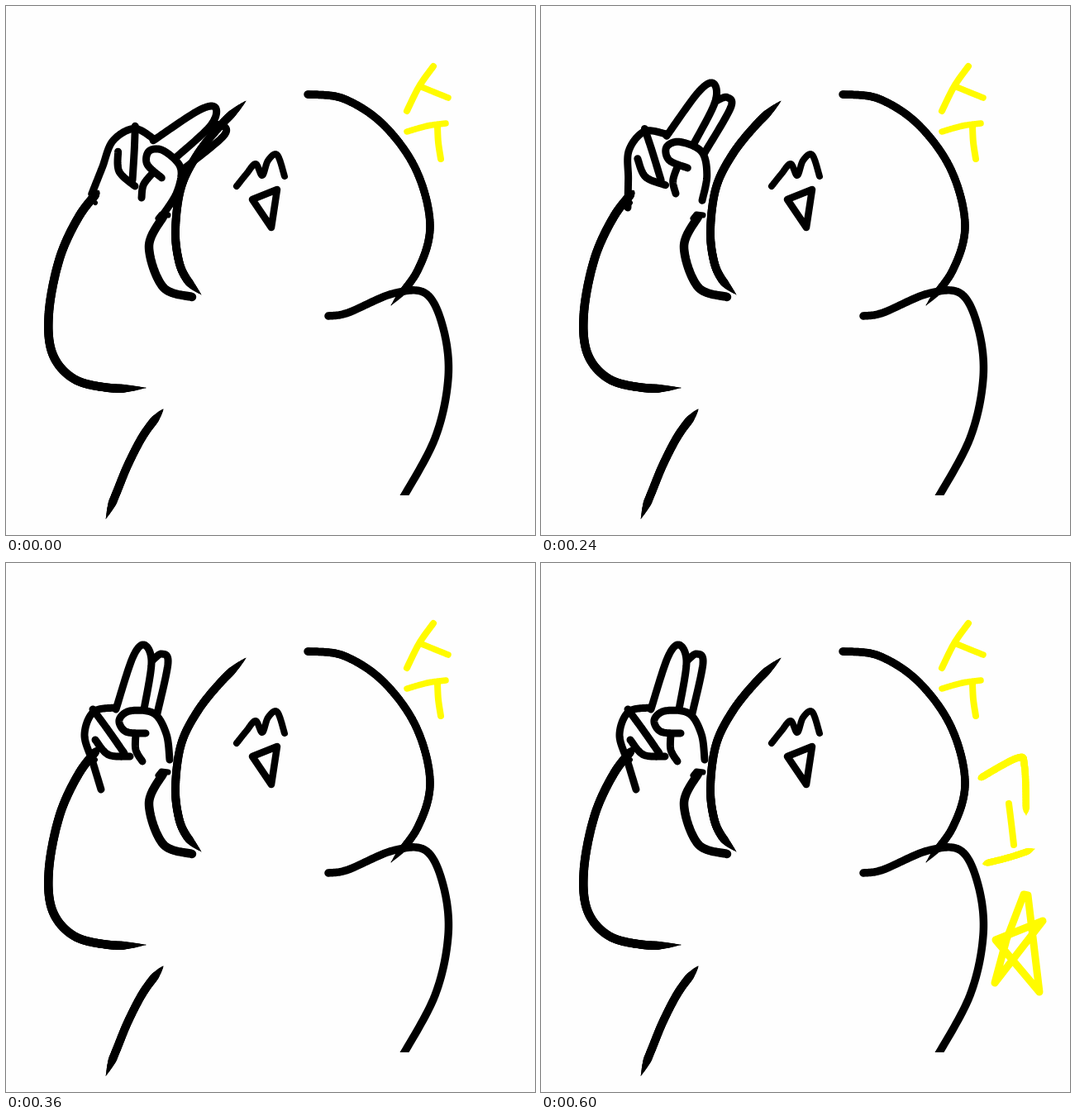
These frames come from a looping animation (640 px wide and 640 px high, 720 ms). An HTML page with a canvas:

```html
<!DOCTYPE html>
<html lang="ko">
<head>
<meta charset="utf-8">
<title>Salute</title>
<style>
html, body { margin: 0; width: 100%; height: 100%; overflow: hidden; background: #fefefe; }
canvas { display: block; width: 100vmin; height: 100vmin; }
</style>
</head>
<body>
<canvas width="640" height="640"></canvas>
<script>
const ctx = document.querySelector('canvas').getContext('2d');
const STEP = 120, STEPS = 6;
const YELLOW = '#fffb00';

// Wrist pivot and tilt in degrees; the hand swings away from the brow and stays
const WRIST = { x: 165, y: 240 };
const POSES = [
  { x: 164, y: 232, tilt: 38.5 },
  { x: 168, y: 228, tilt: 29 },
  { x: 163, y: 227, tilt: 18 },
  { ...WRIST, tilt: 0 }
];

const parse = s => s.split(' ').map(q => q.split(',').map(Number));

// Catmull-Rom curve through the key points
function smooth(keys) {
  const at = i => keys[Math.max(0, Math.min(keys.length - 1, i))];
  const mix = (a, b, c, d, t) => 0.5 * (2 * b + (c - a) * t +
    (2 * a - 5 * b + 4 * c - d) * t * t + (3 * b - a - 3 * c + d) * t ** 3);
  const out = [keys[0]];
  for (let i = 0; i < keys.length - 1; i++) {
    for (let t = 0.05; t < 1.01; t += 0.05) {
      out.push([0, 1].map(n => mix(at(i - 1)[n], at(i)[n], at(i + 1)[n], at(i + 2)[n], t)));
    }
  }
  return out;
}

function trace(points, width) {
  ctx.lineWidth = width;
  ctx.beginPath();
  points.forEach(p => ctx.lineTo(...p));
  ctx.stroke();
}

const poly = (keys, width) => trace(parse(keys), width);

// Curved stroke; head and tail are the lengths of its pointed ends
function brush(keys, width, head = 0, tail = 0) {
  const points = smooth(parse(keys));
  if (!head && !tail) return trace(points, width);
  const gap = i => Math.hypot(points[i][0] - points[i - 1][0], points[i][1] - points[i - 1][1]);
  let left = 0, done = 0;
  for (let i = 1; i < points.length; i++) left += gap(i);
  for (let i = 1; i < points.length; i++) {
    const d = gap(i);
    done += d;
    left -= d;
    const start = head ? Math.min(1, done / head) : 1;
    const end = tail ? Math.min(1, left / tail) : 1;
    trace([points[i - 1], points[i]], Math.max(1, width * (start * end) ** 0.8));
  }
}

function drawBody() {
  // Head
  brush('290,115 260,144 232,179 212,219 205,270 209,308 219,331 236,349', 10, 26, 20);
  brush('365,107 408,112 456,143 496,198 513,265 498,320 466,362', 9.5, 0, 24);
  // Right shoulder, cut flat at the bottom
  ctx.save();
  ctx.beginPath();
  ctx.rect(0, 0, 640, 592);
  ctx.clip();
  brush('390,375 414,371 468,348 508,348 529,390 535,450 519,523 478,599', 9.5);
  ctx.restore();
  // Raised arm
  brush('112,224 88,255 65,305 52,370 56,420 82,451 125,462 169,462', 10.5, 8, 28);
  poly('95,241 102,233 108,238', 6);
  brush('190,255 173,291 190,340 225,352', 10.5);
  poly('184,257 188,252 196,253', 7);
  // Left side
  brush('190,488 167,518 148,554 134,588 121,620', 10, 18, 20);
  // Face
  brush('279,218 291,203 302,191 310,205 317,187 328,180 337,206', 8);
  poly('298,234 328,222 321,268 298,234', 8.5);
}

function drawHand({ x, y, tilt }) {
  ctx.save();
  ctx.translate(x, y);
  ctx.rotate(tilt * Math.PI / 180);
  ctx.translate(-WRIST.x, -WRIST.y);
  [
    '115,274 105,241 95,208 106,180 133,175',         // back
    '133,177 153,115 167,99 176,120 167,177',         // index
    '177,118 188,110 196,121 183,182',                // middle
    '169,206 145,204 137,190 150,179 179,182 194,207 198,238', // thumb
    '105,177 122,200 143,230',                        // folded fingers
    '108,214 124,232 150,234',
    '157,207 157,226 165,240'
  ].forEach(keys => brush(keys, 9));
  ctx.restore();
}

function drawSu() {
  brush('517,73 500,97 485,127', 8);
  brush('503,98 520,105 535,111', 7.5);
  brush('485,152 510,145 532,142', 7.5);
  brush('522,146 523,165 526,185', 8);
}

function drawGo() {
  brush('530,261 576,236 585,246 587,305', 8.5, 6, 8);
  brush('566,291 569,315 572,341', 8);
  brush('535,364 567,356 597,346', 8, 7, 9);
}

function drawStar() {
  poly('549,508 563,456 584,401 589,402 603,519 550,456 607,433 549,508', 9);
}

function draw(step) {
  ctx.fillStyle = '#fefefe';
  ctx.fillRect(0, 0, 640, 640);
  ctx.lineCap = ctx.lineJoin = 'round';
  ctx.strokeStyle = '#000';
  drawBody();
  drawHand(POSES[Math.min(step, POSES.length - 1)]);
  ctx.strokeStyle = YELLOW;
  drawSu();
  if (step >= 4) drawGo();
  if (step >= 5) drawStar();
}

const start = performance.now();
function tick() {
  draw(Math.floor((performance.now() - start) / STEP) % STEPS);
  requestAnimationFrame(tick);
}
tick();
</script>
</body>
</html>
```
